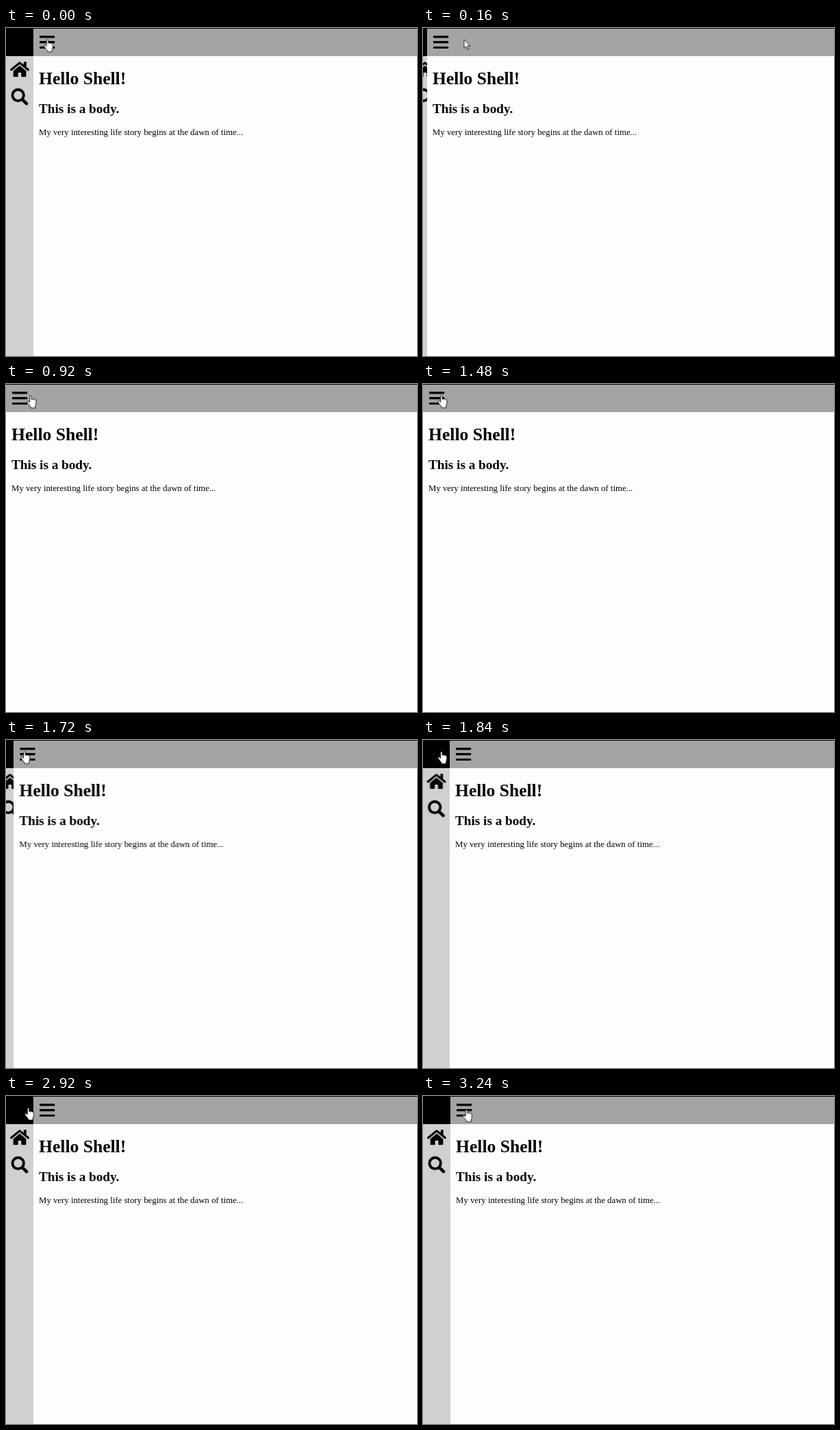
Animation, 600 px wide and 478 px high, one loop 3520 ms. Source, as an HTML page:

```html
<!DOCTYPE html>
<html lang="en">
<head>
<meta charset="utf-8">
<title>Shell with sliding sidebar</title>
<style>
  html, body { margin: 0; width: 100%; height: 100%; overflow: hidden; background: #fdfffd; }
  svg { display: block; }
  text { font-family: "Liberation Serif", "Times New Roman", serif; fill: #000; }
  .bold { font-weight: bold; }

  .icons, .page, .pointer, .hand, .arrow { animation: 3520ms linear infinite; }
  .page { animation-name: slide; }
  .icons { animation-name: recenter; }
  .pointer { animation-name: travel; }
  .hand { animation-name: hand; }
  .arrow { animation-name: arrow; }
  .hand path, .arrow path { fill: #fff; stroke: #000; stroke-width: 1; stroke-linejoin: round; }

  /* The page slides over the sidebar in 200 ms, and back again. */
  @keyframes slide {
    0% { transform: translateX(40px); }
    1.42% { transform: translateX(40px); animation-timing-function: ease; }
    7.1%, 47.78% { transform: translateX(0); animation-timing-function: ease; }
    53.47%, 100% { transform: translateX(40px); }
  }
  /* Icons stay centred in the visible width. */
  @keyframes recenter {
    0% { transform: translateX(20px); }
    1.42% { transform: translateX(20px); animation-timing-function: ease; }
    7.1%, 47.78% { transform: translateX(0); animation-timing-function: ease; }
    53.47%, 100% { transform: translateX(20px); }
  }
  @keyframes travel {
    0%, 7.95% { transform: translate(59.5px, 16.5px); }
    13.64% { transform: translate(65.5px, 17.5px); }
    17.05% { transform: translate(65.5px, 17.5px); animation-timing-function: ease-in-out; }
    30.68% { transform: translate(26px, 16.5px); }
    79.55% { transform: translate(26px, 16.5px); animation-timing-function: ease-in-out; }
    92.05%, 100% { transform: translate(62.5px, 19.5px); }
  }
  @keyframes hand {
    0%, 100% { opacity: 1; animation-timing-function: step-end; }
    3.41% { opacity: 0; animation-timing-function: step-end; }
    25% { opacity: 1; animation-timing-function: step-end; }
  }
  @keyframes arrow {
    0%, 100% { opacity: 0; animation-timing-function: step-end; }
    3.41% { opacity: 1; animation-timing-function: step-end; }
    25% { opacity: 0; animation-timing-function: step-end; }
  }
</style>
</head>
<body>
<svg width="600" height="478" viewBox="0 0 600 478">
  <rect width="40" height="478" fill="#d0d1cf"/>
  <rect width="40" height="41"/>

  <g class="icons">
    <path transform="translate(-14.06 47.8) scale(.04883)" d="M280.4 148.3L96 300V464a16 16 0 0 0 16 16h112a16 16 0 0 0 16-16v-96a16 16 0 0 1 16-16h64a16 16 0 0 1 16 16v96a16 16 0 0 0 16 16h112a16 16 0 0 0 16-16V300L295.7 148.3a12 12 0 0 0-15.3 0zM571.6 251.5L488 182.6V44a12 12 0 0 0-12-12h-56a12 12 0 0 0-12 12v72.6L318.5 43a48 48 0 0 0-61 0L4.3 251.5a12 12 0 0 0-1.6 16.9l25.5 31a12 12 0 0 0 17 1.6l235.2-193.7a12 12 0 0 1 15.3 0L531 301a12 12 0 0 0 17-1.6l25.5-31a12 12 0 0 0-1.9-16.9z"/>
    <g transform="translate(-12.5 87.8) scale(.04883)" fill="none" stroke="#000">
      <circle cx="208" cy="208" r="168" stroke-width="80"/>
      <path d="M340 340L372 372" stroke-width="70"/>
      <path d="M376 376L459 459" stroke-width="96" stroke-linecap="round"/>
    </g>
  </g>

  <g class="page">
    <rect width="600" height="478" fill="#fdfffd"/>
    <rect width="600" height="41" fill="#a4a5a2"/>
    <g transform="translate(9 8.3)">
      <rect y="2.9" width="22.2" height="3.2" rx=".7"/>
      <rect y="10.7" width="22.2" height="3.2" rx=".7"/>
      <rect y="18.6" width="22.2" height="3.2" rx=".7"/>
    </g>
    <text class="bold" x="8" y="82" font-size="25.6">Hello Shell!</text>
    <text class="bold" x="8" y="124" font-size="19.2">This is a body.</text>
    <text x="8" y="156" font-size="12.8">My very interesting life story begins at the dawn of time...</text>
  </g>
  <rect width="600" height="1"/>

  <g class="pointer">
    <g class="hand">
      <path transform="scale(.84) translate(-6 0)" d="M5.5 12V2Q5.5.5 7 .5T8.5 2V7Q8.5 6 9.8 6T11.3 7.2Q11.3 6.4 12.6 6.4T14 7.7Q14.2 7.1 15.2 7.3T16.5 9V13Q16.5 15 15.2 17.5V21.5H7V19.5Q4 16 1 11.8Q.2 10.3 1.6 9.8Q3 9.5 5.5 12z"/>
    </g>
    <g class="arrow">
      <path transform="scale(.84)" d="M.5.5v15l3.5-3.4 2.4 5.6 2.3-1-2.4-5.4h4.7z"/>
    </g>
  </g>
</svg>
</body>
</html>
```
